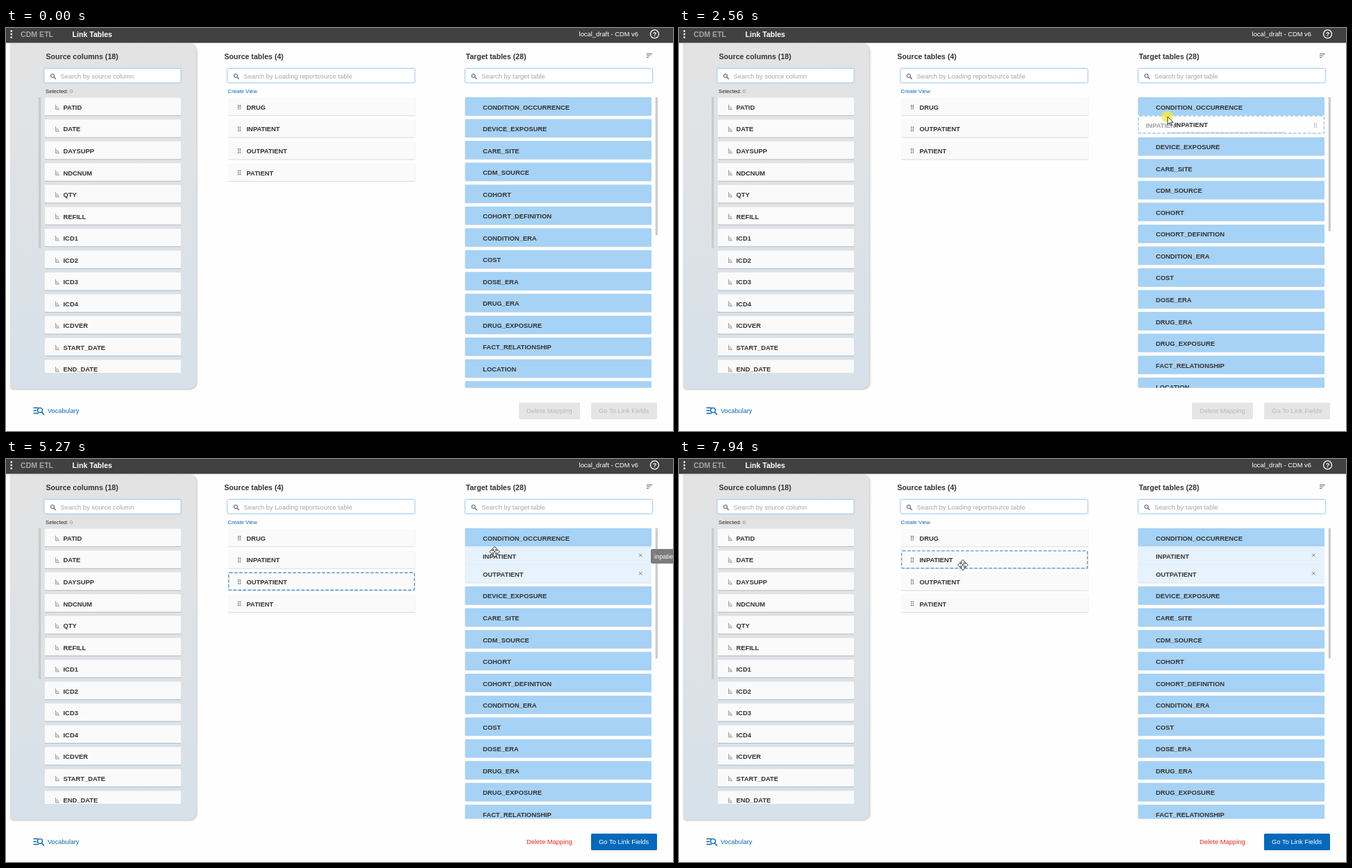
An HTML page for the animation above (8 s loop, 961 px wide and 582 px high).

```html
<!DOCTYPE html>
<html lang="en">
<head>
<meta charset="utf-8">
<title>Link Tables</title>
<style>
  html, body { margin: 0; width: 100%; height: 100%; overflow: hidden; background: #fefefe; }
  svg { display: block; width: 961px; height: 582px; font: 9.4px "Liberation Sans", Arial, sans-serif; }
  .b { font-weight: bold; fill: #333; }
  .h { font-weight: bold; font-size: 10.6px; fill: #333; }
  .hint { fill: #a5a5a5; }
  .small { font-size: 7.8px; }
</style>
</head>
<body>
<svg id="stage" viewBox="0 0 961 582">
  <defs>
    <linearGradient id="panel" x1="0" y1="0" x2="0" y2="1">
      <stop offset="0" stop-color="#e3e3e3"/><stop offset=".45" stop-color="#dfe2e5"/><stop offset="1" stop-color="#d6e1ea"/>
    </linearGradient>
    <filter id="soft" x="-10%" y="-10%" width="120%" height="120%"><feGaussianBlur stdDeviation="1.6"/></filter>
    <clipPath id="leftClip"><rect x="40" y="98" width="230" height="400"/></clipPath>
    <clipPath id="rightClip"><rect x="655" y="98" width="290" height="421.5"/></clipPath>
  </defs>
  <g id="still"></g>
  <g id="live"></g>
</svg>
<script>
const LOOP = 8000, PITCH = 31.54, ROW = 26.2;
const columns = 'PATID DATE DAYSUPP NDCNUM QTY REFILL ICD1 ICD2 ICD3 ICD4 ICDVER START_DATE END_DATE'.split(' ');
const sources = 'DRUG INPATIENT OUTPATIENT PATIENT'.split(' ');
const targets = ('CONDITION_OCCURRENCE DEVICE_EXPOSURE CARE_SITE CDM_SOURCE COHORT COHORT_DEFINITION CONDITION_ERA ' +
  'COST DOSE_ERA DRUG_ERA DRUG_EXPOSURE FACT_RELATIONSHIP LOCATION LOCATION_HISTORY').split(' ');

const rect = (x, y, w, h, fill, extra = '') =>
  `<rect x="${x}" y="${y}" width="${w}" height="${h}" fill="${fill}" ${extra}/>`;
const text = (x, y, s, cls = '', extra = '') => `<text x="${x}" y="${y}" class="${cls}" ${extra}>${s}</text>`;
const path = (d, stroke, width = 1, extra = '') =>
  `<path d="${d}" fill="none" stroke="${stroke}" stroke-width="${width}" ${extra}/>`;
const dashed = (x, y, w, h, color) =>
  rect(x, y, w, h, 'none', `rx="1.5" stroke="${color}" stroke-width="1.4" stroke-dasharray="4.6 2.4"`);

function grip(x, y, color = '#555') {
  let d = '';
  for (let i = 0; i < 6; i++) d += `M${x + (i % 2) * 2.7} ${y + (i >> 1) * 2.6 - 2.6}h1.4`;
  return path(d, color, 1.4);
}

function search(x, w, hint) {
  return rect(x, 58.5, w, 20.5, '#8ec6f2', 'rx="2" opacity=".6" filter="url(#soft)"') +
    rect(x, 58.5, w, 20.5, '#fff', 'rx="2" stroke="#a3d0f3"') +
    `<circle cx="${x + 12}" cy="69" r="2.5" fill="none" stroke="#666" stroke-width="1.1"/>` +
    path(`M${x + 14} 71l2.8 2.8`, '#666', 1.3) + text(x + 23.5, 72.6, hint, 'hint');
}

function drawStill() {
  let s = rect(0, 0, 961, 21.5, '#414141') +
    path('M6.5 4.5h2.4M6.5 9h2.4M6.5 13.5h2.4', '#fff', 2.3) +
    text(21, 12.8, 'CDM ETL', 'h', 'style="fill:#a6a6a6"') +
    text(95.5, 12.8, 'Link Tables', 'h', 'style="fill:#fff"') +
    text(911, 11.6, 'local_draft - CDM v6', '', 'fill="#fff" text-anchor="end"') +
    '<circle cx="934.5" cy="8.7" r="6" fill="none" stroke="#fff" stroke-width="1.3"/>' +
    text(934.5, 12, '?', 'b', 'style="fill:#fff" text-anchor="middle"');

  const shape = 'M6 22H264a10 10 0 0 1 10 10V511a10 10 0 0 1-10 10H10a4 4 0 0 1-4-4Z';
  s += `<path d="${shape}" fill="#999" opacity=".65" transform="translate(1 1)" filter="url(#soft)"/>` +
    `<path d="${shape}" fill="url(#panel)"/>`;

  s += text(57.5, 45, 'Source columns (18)', 'h') + text(314.5, 45, 'Source tables (4)', 'h') +
    text(662.5, 45, 'Target tables (28)', 'h') +
    search(55, 197, 'Search by source column') + search(319, 270, 'Search by Loading reportsource table') +
    search(661.5, 270, 'Search by target table') +
    path('M923 37.5h8M923 40h5.5M923 42.5h3', '#666', 1.1) +
    text(57, 94.3, 'Selected: <tspan fill="#888">0</tspan>', 'small', 'fill="#222"') +
    text(319.5, 94.3, 'Create View', 'small', 'fill="#0a67b5"');

  s += '<g clip-path="url(#leftClip)">' + columns.map((name, i) => {
    const y = 100.7 + i * PITCH;
    return rect(56, y + .8, 196, 25.6, '#b5bbc0', 'rx="1"') + rect(56, y, 196, 25.4, '#fafafa', 'rx="1"') +
      path(`M71.5 ${y + 10}v7h5.5M73.5 ${y + 12}v4M75.5 ${y + 14}v2`, '#999', 1) +
      text(82.5, y + 17.2, name, 'b');
  }).join('') + '</g>' + rect(47, 100, 3.3, 218, '#cbcbcb');

  return s + path('M39.5 548.5h7M39.5 552.5h5M39.5 556.5h7.5M51.5 555l3.5 3.5', '#0a67b5', 1.5) +
    '<circle cx="49" cy="552" r="3.4" fill="none" stroke="#0a67b5" stroke-width="1.4"/>' +
    text(60, 556.4, 'Vocabulary', '', 'fill="#0a67b5" style="font-size:9.2px"');
}

// Pointer stops: time, x, y, and 1 for an eased approach
const stops = [
  [290, 774, 457], [359, 774, 457], [360, 664, 338], [700, 664, 338], [1520, 432, 143, 1],
  [1580, 432, 143], [1700, 474, 146], [1960, 662, 134], [2020, 677, 130], [2380, 698, 121],
  [2500, 704, 125], [2560, 704, 128], [2740, 712, 132], [2990, 712, 132], [3740, 430, 176, 1],
  [3800, 430, 176], [3950, 470, 174], [4280, 652, 150], [4340, 664, 148], [4600, 693, 140],
  [4660, 700, 139], [4910, 700, 139], [5150, 704, 134], [5690, 704, 134], [6150, 584, 160, 1],
  [6550, 716, 110, 1], [6610, 716, 110], [6730, 725, 107], [6900, 789, 112, 1], [7200, 434, 165, 1],
  [7400, 620, 160, 1], [7480, 620, 160], [7940, 409, 153, 1], [8000, 409, 153]
];

function pointer(t) {
  const i = stops.findIndex(p => p[0] > t);
  if (i < 1) return [stops[0][1], stops[0][2]];
  const a = stops[i - 1], b = stops[i];
  let k = (t - a[0]) / (b[0] - a[0]);
  if (b[3]) k = k * k * (3 - 2 * k);
  return [a[1] + (b[1] - a[1]) * k, a[2] + (b[2] - a[2]) * k];
}

function sceneAt(t) {
  const within = (a, b) => t >= a && t < b;
  const drag = within(1580, 2990) ? 'INPATIENT' : within(3800, 4910) ? 'OUTPATIENT' : '';
  const zone = within(1950, 2140) ? 'device' : within(2140, 2500) ? 'top' : within(2500, 2990) ? 'below' :
    within(4390, 4910) ? 'below' : '';
  const picked = within(2990, 3800) || t >= 7820 ? 'INPATIENT' : within(4910, 7820) ? 'OUTPATIENT' : '';
  const links = t < 2990 ? [] : t < 4910 ? ['INPATIENT'] : ['INPATIENT', 'OUTPATIENT'];
  const tip = within(3060, 3250) || within(4460, 4940) || within(5150, 5870);
  return { drag, zone, picked, links, tip };
}

function drawSources({ drag, zone, picked }) {
  return sources.filter(n => !(zone && n === drag)).map((name, i) => {
    const y = 100.7 + i * PITCH, hole = name === drag;
    let s = hole ? '' : rect(320, y + .8, 269.5, 25.8, '#dcdcdc', 'rx="1"') + rect(320, y, 269.5, 25.6, '#fafafa', 'rx="1"');
    if (hole || name === picked) s += dashed(320.7, y + .4, 267.8, 25, hole ? '#a3c9e8' : '#5599d2');
    return s + grip(334, y + 13.6, hole ? '#aaa' : '#555') +
      text(346.5, y + 17.2, name, 'b', hole ? 'style="fill:#999"' : '');
  }).join('');
}

function targetRow(kind, name, y, zone) {
  if (kind === 'hole')
    return rect(661.5, y, 268.5, ROW, '#fefefe') + dashed(662, y + .8, 267.5, 25, '#9dc8ea') +
      text(672.5, y + 17.6, name, 'b', 'style="fill:#a0a0a0"') +
      grip(zone === 'device' ? 925 : 915, y + 14, '#aaa');
  const y2 = y + 10.5;
  return rect(661.5, y + .8, 268.5, ROW, '#d5dde4', 'rx="1"') +
    rect(661.5, y, 268.5, ROW + .2, kind === 'head' ? '#a6d2f5' : '#e6f2fe', 'rx="1"') +
    text(687, y + 17.5, name, 'b') +
    (kind === 'link' ? path(`M912 ${y2}l4.6 4.6m0-4.6l-4.6 4.6`, '#777', .9) : '');
}

function drawTargets({ drag, zone, links }) {
  let y = 100, s = '';
  targets.forEach((name, i) => {
    const hole = ['hole', drag];
    const light = i === 0 && zone === 'top' || i === 1 && zone === 'device';
    const group = [[light ? 'light' : 'head', name]];
    if (light) group.unshift(hole);
    if (i === 0) {
      if (zone === 'below') group.push(hole);
      links.forEach(n => group.push(['link', n]));
    }
    for (const [kind, label] of group) {
      s += targetRow(kind, label, y, zone);
      y += ROW;
    }
    y += PITCH - ROW;
  });
  const extra = links.length + (zone ? 1 : 0);
  return `<g clip-path="url(#rightClip)">${s}</g>` + rect(935.7, 100, 3.3, 199 - 5.5 * extra, '#cbcbcb');
}

function drawButtons(on) {
  return (on ? '' : rect(739, 541, 88, 24, '#e5e5e5', 'rx="1.5"')) +
    rect(843, 541, 95, 24, on ? '#0668bb' : '#e5e5e5', 'rx="1.5"') +
    text(750, 556.4, 'Delete Mapping', '', `fill="${on ? '#e5261d' : '#b8b8b8'}"`) +
    text(854, 556.4, 'Go To Link Fields', '', `fill="${on ? '#fff' : '#b8b8b8'}"`);
}

function drawPointer(t, { drag, links }) {
  if (t < 290) return '';
  const [x, y] = pointer(t);
  let s = '';
  if (drag) {
    const [px, py] = pointer(t - 60);
    s += path(`M${px} ${py + 26}h168`, '#bbb', 1) + text(px + 10, py + 18.3, drag, 'b') +
      `<circle cx="${x - .5}" cy="${y}" r="8" fill="#f7e93c" opacity=".8"/>`;
  }
  const overSource = x > 320 && x < 590 && y > 100 && y < 222 && (y - 100.7) % PITCH < ROW;
  const overLink = x > 661 && x < 930 && y > 126 && y < 126 + links.length * ROW;
  if (!drag && (overSource || overLink)) {
    const arm = 'M-1 0V-4H-2.8L0-7 2.8-4H1V0Z';
    const arms = [0, 90, 180, 270].map(a => `<path d="${arm}" transform="rotate(${a})"/>`).join('');
    return s + `<g transform="translate(${x} ${y})"><g fill="#222" stroke="#222" stroke-width="1.2">${arms}</g>` +
      `<g fill="#fff">${arms}</g><circle r="1" fill="#222"/></g>`;
  }
  return s + `<path transform="translate(${x} ${y})" d="M0 0V11.2L2.6 8.8 4.4 12.8 6.2 12 4.4 8.2H8Z" ` +
    'fill="#fff" stroke="#222" stroke-width=".9"/>';
}

const live = document.getElementById('live');
document.getElementById('still').innerHTML = drawStill();

function frame(now) {
  const t = now % LOOP, scene = sceneAt(t);
  live.innerHTML = drawSources(scene) + drawTargets(scene) + drawButtons(scene.links.length > 0) +
    (scene.tip ? rect(929, 130, 50, 21, '#7c7c7c', 'rx="2.5"') +
      text(934, 143.8, 'inpatient', '', 'fill="#fff" style="font-size:9.2px"') : '') +
    drawPointer(t, scene);
  requestAnimationFrame(frame);
}
requestAnimationFrame(frame);
</script>
</body>
</html>
```
